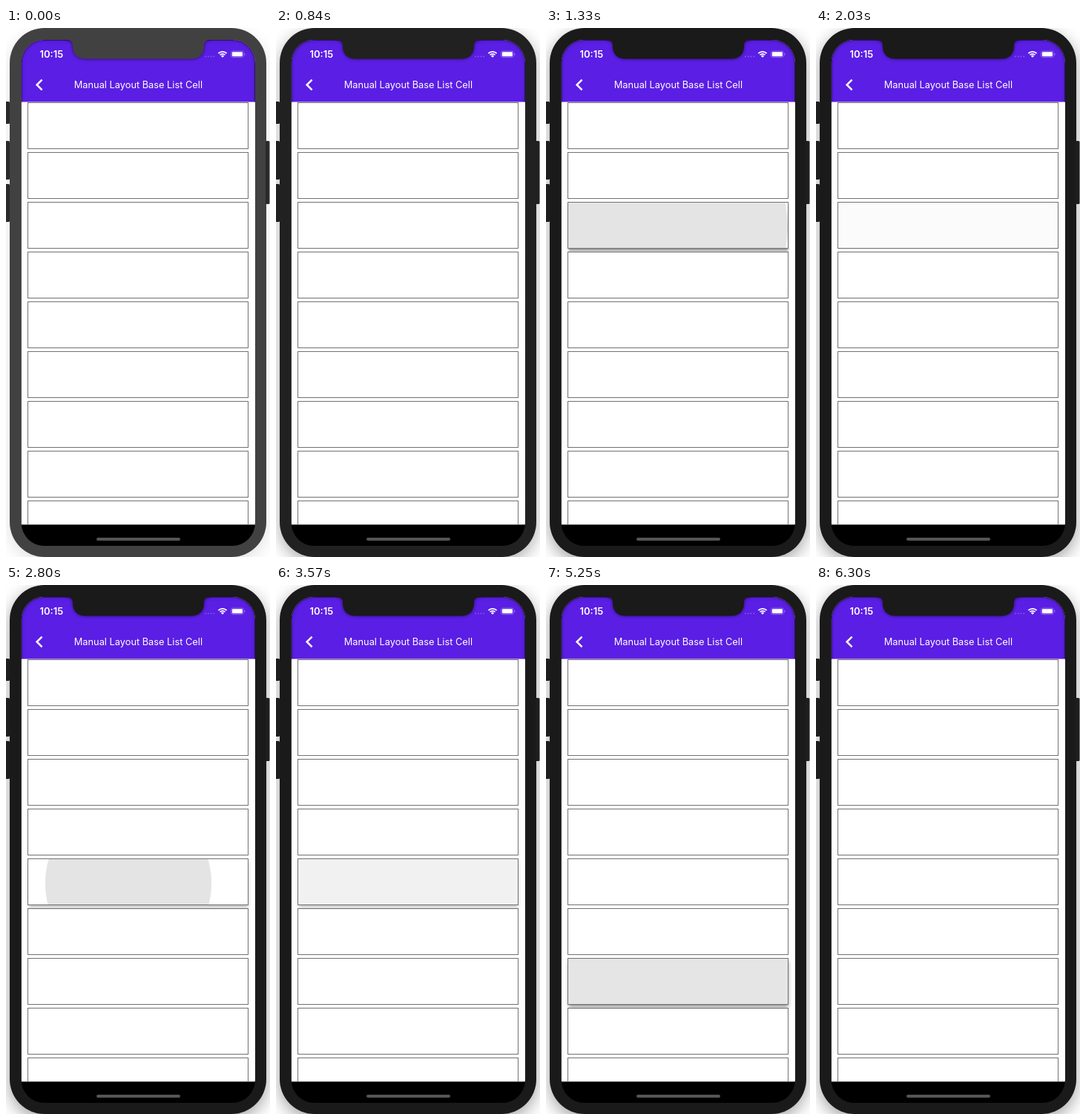
Write an HTML page with a canvas that moves like this. It is 356 px wide and 712 px high and loops after 6.37 s.

```html
<!DOCTYPE html>
<html lang="en">
<head>
<meta charset="utf-8">
<title>List cell ripple</title>
<style>
html, body { margin: 0; width: 100%; height: 100%; overflow: hidden; background: #fff; }
canvas { display: block; width: 356px; height: 712px; }
</style>
</head>
<body>
<canvas id="stage"></canvas>
<script>
const W = 356, H = 712, LOOP = 6370, STEP = 70;
const canvas = document.getElementById('stage');
const ctx = canvas.getContext('2d');
const dpr = window.devicePixelRatio || 1;
canvas.width = W * dpr;
canvas.height = H * dpr;

const SCREEN = { x: 20.6, y: 16, w: 315.4, h: 681, r: 31 };
const LIST = { top: 99.5, bottom: 668.4 };
const CELL = { x: 29.5, y: 100, w: 297, h: 62, pitch: 67.1, count: 9 };
const PURPLE = '#5b1ee4';
const RIPPLE = { radius: 170, time: 240, color: '229,228,228' };

// Each touch: lift the cell, spread the ink, then let both go.
const presses = [
  { row: 2, lift: 1085, ink: 1145, release: 1730, fade: 350, drop: 3.5, blur: 3, dark: 0.48 },
  { row: 4, lift: 2640, ink: 2700, release: 3400, fade: 350, drop: 3, blur: 5, dark: 0.5 },
  { row: 6, lift: 4180, ink: 4340, release: 5240, fade: 220, drop: 3, blur: 5, dark: 0.5 }
];

const clamp = v => Math.max(0, Math.min(1, v));
const ramp = (t, start, time) => clamp((t - start) / time);
const easeOut = p => 1 - (1 - p) * (1 - p);
const mix = (a, b, p) => Math.round(a + (b - a) * p);
const gray = v => `rgb(${v},${v},${v})`;
const cellTop = row => Math.floor(CELL.y + row * CELL.pitch) + 0.5;

function fillRect(x, y, w, h, color) {
  ctx.fillStyle = color;
  ctx.fillRect(x, y, w, h);
}

function fillRound(x, y, w, h, r, color) {
  ctx.fillStyle = color;
  ctx.beginPath();
  ctx.roundRect(x, y, w, h, r);
  ctx.fill();
}

function setShadow(alpha, blur, drop) {
  ctx.shadowColor = `rgba(0,0,0,${alpha})`;
  ctx.shadowBlur = blur * dpr;
  ctx.shadowOffsetY = drop * dpr;
}

function drawBody(focus) {
  const side = gray(mix(42, 30, focus));
  ctx.save();
  setShadow(0.12 + 0.24 * focus, 22, 7);
  fillRound(5, 0, 346, 712, 47, gray(mix(65, 26, focus)));
  ctx.restore();
  for (const [y, h] of [[99, 30], [152, 52], [210, 51]]) {
    fillRound(-2, y, 7, h, 1.5, side);
  }
  fillRound(350, 152, 5.5, 85, 1.5, side);
}

function drawNotch(focus) {
  ctx.save();
  setShadow(0.6, 4, 0);
  ctx.fillStyle = gray(mix(65, 26, focus));
  ctx.beginPath();
  ctx.moveTo(82, 10);
  ctx.lineTo(82, 16);
  ctx.quadraticCurveTo(90, 16, 90, 24);
  ctx.bezierCurveTo(90, 35, 96, 41.5, 107, 41.5);
  ctx.lineTo(250, 41.5);
  ctx.bezierCurveTo(261, 41.5, 267, 35, 267, 24);
  ctx.quadraticCurveTo(267, 16, 275, 16);
  ctx.lineTo(275, 10);
  ctx.fill();
  ctx.restore();
}

// Soft dark rim where the header meets the bezel.
function drawRim() {
  ctx.save();
  ctx.beginPath();
  ctx.rect(0, 0, W, LIST.top);
  ctx.clip();
  ctx.beginPath();
  ctx.roundRect(SCREEN.x, SCREEN.y, SCREEN.w, SCREEN.h, SCREEN.r);
  setShadow(0.6, 4, 0);
  ctx.strokeStyle = 'rgba(0,0,0,.45)';
  ctx.lineWidth = 2;
  ctx.stroke();
  ctx.restore();
}

function drawCell(row) {
  ctx.strokeStyle = '#727272';
  ctx.lineWidth = 1;
  ctx.strokeRect(CELL.x, cellTop(row), CELL.w, CELL.h);
}

function drawPress(p, t) {
  const left = 1 - ramp(t, p.release, p.fade);
  const lift = ramp(t, p.lift, 280) * left;
  if (lift <= 0) return;
  const y = cellTop(p.row);
  ctx.save();
  setShadow(p.dark * lift, p.blur, p.drop);
  fillRect(CELL.x, y, CELL.w, CELL.h, '#fff');
  ctx.restore();

  const r = RIPPLE.radius * easeOut(ramp(t, p.ink, RIPPLE.time));
  if (r > 0) {
    ctx.save();
    ctx.beginPath();
    ctx.rect(CELL.x, y, CELL.w, CELL.h);
    ctx.clip();
    ctx.fillStyle = `rgba(${RIPPLE.color},${left})`;
    ctx.beginPath();
    ctx.arc(165, y + 33, r, 0, Math.PI * 2);
    ctx.fill();
    ctx.restore();
  }
  drawCell(p.row);
}

function drawList(t) {
  ctx.save();
  ctx.beginPath();
  ctx.rect(SCREEN.x, LIST.top, SCREEN.w, LIST.bottom - LIST.top);
  ctx.clip();
  for (let row = 0; row < CELL.count; row++) drawCell(row);
  for (const p of presses) drawPress(p, t);
  ctx.restore();
}

function drawWifi(x, y) {
  const from = -Math.PI * 0.75, to = -Math.PI * 0.25;
  ctx.strokeStyle = ctx.fillStyle = '#fff';
  ctx.lineWidth = 1.7;
  for (const r of [5, 8]) {
    ctx.beginPath();
    ctx.arc(x, y, r, from, to);
    ctx.stroke();
  }
  ctx.beginPath();
  ctx.moveTo(x, y);
  ctx.arc(x, y, 3, from, to);
  ctx.fill();
}

function drawStatus() {
  ctx.fillStyle = '#fff';
  ctx.textAlign = 'center';
  ctx.font = '600 13px Inter, "Liberation Sans", sans-serif';
  ctx.fillText('10:15', 61.3, 40);
  for (let i = 0; i < 4; i++) {
    fillRound(268 + i * 3.8, 37.4, 1.8, 1.8, 0.9, 'rgba(255,255,255,.3)');
  }
  drawWifi(292, 39.8);
  ctx.strokeStyle = 'rgba(255,255,255,.35)';
  ctx.lineWidth = 0.8;
  ctx.beginPath();
  ctx.roundRect(303.4, 31, 17, 8.6, 2.4);
  ctx.stroke();
  fillRound(304.8, 32.3, 14.2, 6, 1.3, '#fff');
  fillRound(321.3, 33.9, 1.1, 2.8, 0.5, 'rgba(255,255,255,.35)');
}

function drawHeader() {
  ctx.strokeStyle = '#fff';
  ctx.lineWidth = 2.5;
  ctx.beginPath();
  ctx.moveTo(48.6, 69.6);
  ctx.lineTo(41.6, 76.5);
  ctx.lineTo(48.6, 83.4);
  ctx.stroke();
  ctx.fillStyle = '#fff';
  ctx.textAlign = 'center';
  ctx.font = '400 12.8px Inter, "Liberation Sans", sans-serif';
  ctx.fillText('Manual Layout Base List Cell', 178.4, 81);
}

function draw(t) {
  const focus = ramp(t, 490, 420);
  ctx.setTransform(dpr, 0, 0, dpr, 0, 0);
  fillRect(0, 0, W, H, '#fff');
  drawBody(focus);

  ctx.save();
  ctx.beginPath();
  ctx.roundRect(SCREEN.x, SCREEN.y, SCREEN.w, SCREEN.h, SCREEN.r);
  ctx.clip();
  fillRect(SCREEN.x, SCREEN.y, SCREEN.w, SCREEN.h, '#000');
  fillRect(SCREEN.x, SCREEN.y, SCREEN.w, LIST.bottom - SCREEN.y, '#fff');
  fillRect(SCREEN.x, SCREEN.y, SCREEN.w, LIST.top - SCREEN.y, PURPLE);
  drawList(t);
  drawRim();
  drawNotch(focus);
  ctx.restore();

  drawStatus();
  drawHeader();
  fillRound(122, 686, 113, 4, 2, '#555');
}

function tick() {
  const t = performance.now() % LOOP;
  draw(Math.floor(t / STEP) * STEP);
  requestAnimationFrame(tick);
}
tick();
</script>
</body>
</html>
```
